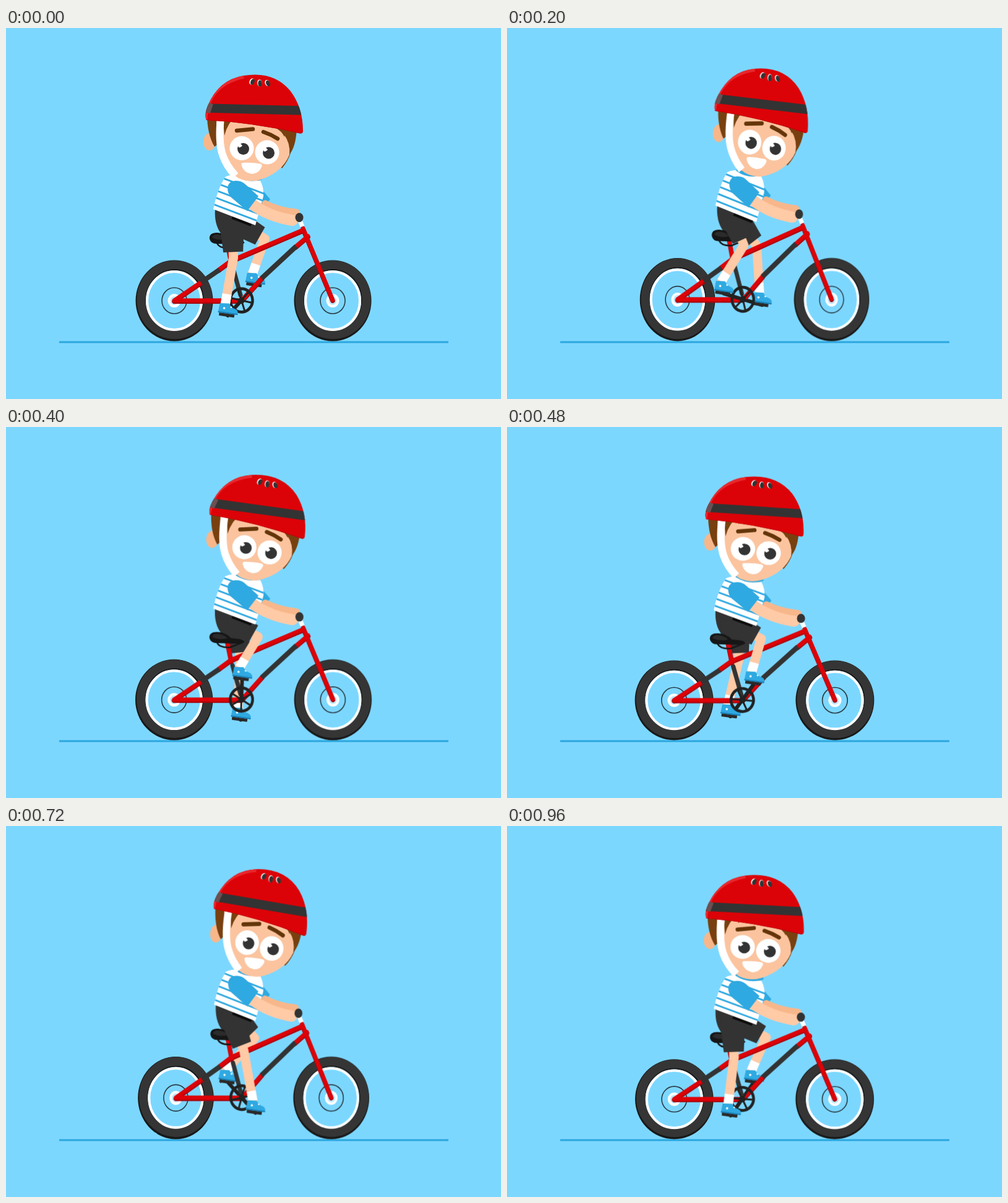
Animation of 800 by 600 pixels, one loop 1000 ms. Source, as an HTML page:

```html
<!DOCTYPE html>
<html lang="en">
<head>
<meta charset="utf-8">
<title>Boy on a bike</title>
<style>
  html, body { margin: 0; width: 100%; height: 100%; overflow: hidden; background: #7cd7ff; }
  svg { display: block; width: 100vw; height: 100vh; }
  .red { stroke: #dc0308; }
  .dark { stroke: #333; }
  .line { fill: none; stroke-linecap: round; stroke-linejoin: round; }
  .skin { fill: #fbc49f; }
  .blue { fill: #2fa9e1; }
  .hair { fill: #78400f; }
  .ink { fill: #333; }
  .leg { stroke: #ffcaa6; stroke-width: 15; }
  .sock { stroke: #fff; stroke-width: 15; stroke-linecap: butt; }
  .crank { stroke: #222; stroke-width: 6; }
</style>
</head>
<body>
<svg viewBox="0 0 800 600" xmlns="http://www.w3.org/2000/svg">
  <defs>
    <filter id="rough" filterUnits="userSpaceOnUse" x="195" y="55" width="410" height="460" color-interpolation-filters="sRGB">
      <feTurbulence type="fractalNoise" baseFrequency=".22" numOctaves="1" seed="4"/>
      <feDisplacementMap in="SourceGraphic" scale="1.6" xChannelSelector="R" yChannelSelector="G"/>
    </filter>
    <g id="wheel">
      <path d="M-62.5 0a62.5 65.5 0 1 0 125 0a62.5 65.5 0 1 0 -125 0M-46 0a46 49 0 1 1 92 0a46 49 0 1 1 -92 0" fill="#191919"/>
      <ellipse cx=".5" cy="-1.5" rx="54" ry="56.500" fill="none" stroke="#353535" stroke-width="14"/>
      <ellipse rx="44" ry="47" fill="none" stroke="#fff" stroke-width="4"/>
      <ellipse rx="20" ry="21" fill="none" stroke="#2b3b45" stroke-width="1.600"/>
      <ellipse rx="8.500" ry="9" fill="#bfeaff" stroke="#fff" stroke-width="4"/>
    </g>
    <g id="shoe">
      <rect x="-14" y="5" width="25" height="7" rx="1" fill="#2a2a2a"/>
      <path d="M-15 -8L0 -9.500Q4 -3 11 -2Q17 0 16 7L-16 7Z" class="blue"/>
      <path d="M-16 6H16" stroke="#1b7fb5" stroke-width="2"/>
      <circle cx="-7" cy="-1" r="1.800" fill="#fff"/>
      <circle cx="4" cy="-4" r="1.300" fill="#fff"/>
    </g>
    <path id="tubes" d="M272 441H380M272 441L316 411M344 391L363 377L480 327M488 337L468 354M414 404L382 440M358 348L364 378M480 324L528 440"/>
    <g id="eye">
      <circle r="19.500" fill="#fff"/>
      <circle cx="2.500" cy="1" r="9.500" class="ink"/>
      <path d="M-8 -5L-3 -9L1 -4Q-1 -2 -4 -1Z" fill="#fff"/>
    </g>
    <clipPath id="shirtClip">
      <path id="shirt" d="M354 241Q363 236 374 238Q392 248 411 247Q417 258 416 272L403 319L335 293Q341 262 354 241Z"/>
    </clipPath>
    <clipPath id="shell">
      <path id="dome" d="M324 149Q320 141 326 126Q343 84 384 77Q432 69 459 101Q480 128 480 167Q480 171 475 170.500Q400 153 324 149Z"/>
    </clipPath>
  </defs>

  <path d="M86 508H715" stroke="#2ba7de" stroke-width="3"/>

  <g filter="url(#rough)"><g id="all">
    <use href="#wheel" x="272" y="441"/>
    <use href="#wheel" x="528" y="441"/>

    <path id="crankB" class="line crank"/>
    <path id="legB" class="line leg"/>
    <path id="sockB" class="line sock"/>
    <use id="shoeB" href="#shoe"/>
    <path id="thighB" class="ink"/>

    <path d="M416 264L427 277L419 287L408 285Z" class="blue"/>
    <path d="M419 284Q440 295 469 298" class="line" stroke="#f7b78b" stroke-width="11"/>
    <path d="M338 292L398 315L393 334Q366 350 348 333Q336 318 338 292Z" class="ink"/>

    <path d="M366 385L379 432" class="line dark" stroke-width="7"/>
    <use href="#tubes" y="1.200" class="line" stroke="#a8040d" stroke-width="7.500"/>
    <use href="#tubes" y="-.5" class="line red" stroke-width="6.500"/>
    <path d="M315 411.500L345 391M469 353L413 405" fill="none" class="dark" stroke-width="8"/>
    <path d="M474 309L479 321" stroke="#fff" stroke-width="7"/>
    <path d="M341 348Q345 357 362 356L384 347" class="line" stroke="#181818" stroke-width="2.600"/>
    <path d="M329 341Q328 331 341 331Q354 331 364 341L382 343Q387 347 380 350L341 349Q331 349 329 341Z" fill="#161616"/>
    <path d="M333 339Q334 334 341 334Q351 334 358 341Q345 345 333 339Z" fill="#2b2b2b"/>

    <g id="ring" class="line" stroke="#222">
      <circle r="18" stroke-width="4.500"/>
      <path d="M-18 0H18M-9 -15.600L9 15.600M9 -15.600L-9 15.600" stroke-width="3"/>
      <circle r="4.500" fill="#222"/>
    </g>
    <path id="crankF" class="line crank"/>
    <path id="legF" class="line leg"/>
    <path id="sockF" class="line sock"/>
    <use id="shoeF" href="#shoe"/>
    <path id="thighF" class="ink"/>

    <path d="M366 305L397 317" stroke="#0d0d0d" stroke-width="8"/>
    <path d="M374 234L411 238L410 246Q391 256 372 242Z" fill="#f0ae80"/>
    <use href="#shirt" fill="#fff"/>
    <g clip-path="url(#shirtClip)">
      <path d="M330 235L430 273M330 247L430 285M330 259L430 297M330 271L430 309M330 283L430 321" stroke="#2fa9e1" stroke-width="2.800"/>
    </g>
    <path d="M372 237Q390 249 412 243" class="line" stroke="#2fa9e1" stroke-width="5"/>
    <path d="M398 285Q425 305 463 311" class="line" stroke="#ffcaa6" stroke-width="18"/>
    <path d="M358 258Q360 247 372 247Q381 247 387 253L408 272L390 296L364 274Q358 268 358 258Z" class="blue"/>
    <ellipse cx="474" cy="306.500" rx="6.500" ry="7.500" class="ink"/>

    <g id="head">
      <ellipse cx="329" cy="184" rx="10" ry="14" fill="#f7b78b"/>
      <path d="M444 150L470 155Q470 187 460 202Q456 215 446 227L440 220Z" class="hair"/>
      <path d="M325 140L346 140V185L337 192Q325 172 325 140Z" class="hair"/>
      <path d="M340 140L341 187Q349 226 376 243Q394 251 412 245Q447 233 458 205Q460 186 449 172L445 150Z" class="skin"/>
      <path d="M350 140H374Q358 153 353 174ZM436 150H452L450 176Q445 166 436 162Z" class="hair"/>
      <path d="M347 145Q343 184 350 205Q356 223 371 239" fill="none" stroke="#fff" stroke-width="12"/>
      <use href="#eye" x="381" y="194.500"/>
      <use href="#eye" x="422" y="201"/>
      <path d="M373 166L399 163.500M416 168Q428 172 439 179" class="line" stroke="#643509" stroke-width="6.500"/>
      <path id="mouth" d="M382 218Q398 217 411 219.500Q415 221 413 225Q408 236 397 236Q384 234 380.500 222Q380 219 382 218Z" fill="#fff"/>
    </g>

    <g id="helmet">
      <use href="#dome" fill="#dc0308"/>
      <g clip-path="url(#shell)">
        <path d="M322 148Q324 92 384 78" fill="none" stroke="#e8282d" stroke-width="7"/>
        <path d="M318 129.500L484 133.500" class="dark" stroke-width="14.500"/>
        <path d="M326 137L331 122" stroke="#6b5052" stroke-width="8"/>
        <path d="M322 149Q400 153 480 171" fill="none" stroke="#c2040d" stroke-width="2"/>
      </g>
      <g fill="#fff">
        <ellipse cx="397.300" cy="86.500" rx="3.700" ry="5.300" transform="rotate(24 397.300 86.500)"/>
        <ellipse cx="409.800" cy="88.800" rx="3.700" ry="5.600"/>
        <ellipse cx="422.300" cy="89" rx="3.700" ry="5.300" transform="rotate(-24 422.300 89)"/>
      </g>
      <g class="ink">
        <ellipse cx="398.500" cy="87" rx="3.200" ry="5" transform="rotate(24 398.500 87)"/>
        <ellipse cx="410.500" cy="89.500" rx="3.200" ry="5.300"/>
        <ellipse cx="423.500" cy="89.500" rx="3.200" ry="5" transform="rotate(-24 423.500 89.500)"/>
      </g>
    </g>
  </g></g>
</svg>
<script>
const LOOP = 1000, STEP = 40;
const BB = [380.5, 440.5], CRANK = 33;

// time, crank angle, stretch, head x/y/turn, helmet x/y/turn
const POSES = [
  [0, 132, 0, 0, 0, 0, 0, 0, 0],
  [120, 168, .017, 8.6, -1.2, 2, 6, 0, 1],
  [220, 203, .028, 10.5, 0, 4.5, 10, 2, 6],
  [320, 240, .017, 9, 1.7, 5, 11, 3.5, 10],
  [480, 305, -.015, .5, -2, .7, -1.5, -2, 2.5],
  [600, 358, .023, 10, 0, 3, 7.5, 1, 2],
  [720, 407, .019, 8, 1, 4, 9, 2.5, 8],
  [840, 452, -.008, .5, -1, 1, 3, 1, 6],
  [960, 484, -.013, 0, -3, 0, -1, -2, 1.7]
];

const $ = id => document.getElementById(id);
const set = (id, name, value) => $(id).setAttribute(name, value);
const move = (id, value) => set(id, 'transform', value);

// Pose by index, wrapped around the loop
function pose(i) {
  const n = POSES.length, turn = Math.floor(i / n);
  const p = POSES[i - turn * n].slice();
  p[0] += turn * LOOP;
  p[1] += turn * 360;
  return p;
}

// Smooth cubic through the poses
function sample(t) {
  let i = POSES.length - 1;
  while (POSES[i][0] > t) i--;
  const [a, b, c, d] = [-1, 0, 1, 2].map(k => pose(i + k));
  const h = c[0] - b[0], u = (t - b[0]) / h;
  return b.map((v, k) => {
    const m0 = (c[k] - a[k]) / (c[0] - a[0]) * h;
    const m1 = (d[k] - v) / (d[0] - b[0]) * h;
    const e = u * u * (3 - 2 * u);
    return v + (c[k] - v) * e + u * (1 - u) * ((1 - u) * m0 - u * m1);
  });
}

const along = (p, q, len) => {
  const d = Math.hypot(q[0] - p[0], q[1] - p[1]);
  return [p[0] + (q[0] - p[0]) * len / d, p[1] + (q[1] - p[1]) * len / d];
};
const path = pts => 'M' + pts.map(p => p.map(v => v.toFixed(2)).join(' ')).join('L');

function leg(side, deg, shift) {
  const a = deg * Math.PI / 180, cos = Math.cos(a), sin = Math.sin(a);
  const pedal = [BB[0] + CRANK * cos, BB[1] + CRANK * sin];
  const hip = [365 + shift, 315];
  const knee = [389 + shift + 12 * cos - 18 * sin, 356 - 4 * cos + 17 * sin];
  const ankle = [pedal[0] - 4, pedal[1] - 19];
  const hem = along(knee, hip, 9);
  const [nx, ny] = along([0, 0], [hip[1] - knee[1], knee[0] - hip[0]], 1);
  const edge = (p, w) => [p[0] + nx * w, p[1] + ny * w];

  set('crank' + side, 'd', path([BB, pedal]));
  set('leg' + side, 'd', path([hem, knee, ankle]));
  set('sock' + side, 'd', path([along(ankle, knee, 16), ankle]));
  set('thigh' + side, 'd', path([edge(hip, 20), edge(hem, 16), edge(hem, -16), edge(hip, -20)]) +
    'A20 20 0 0 0 ' + edge(hip, 20).join(' ') + 'Z');
  move('shoe' + side, `translate(${pedal[0] + 1} ${pedal[1] - 10}) rotate(8)`);
}

function draw(t) {
  const [, deg, s, hx, hy, hr, cx, cy, cr] = sample(t);
  move('all', `translate(401 507) scale(${1 - s} ${1 + s}) translate(-401 -507)`);
  move('head', `translate(${hx} ${hy}) rotate(${hr} 396 200)`);
  move('mouth', `translate(${-hx * .25} 0)`);
  move('helmet', `translate(${cx} ${cy}) rotate(${cr} 401 158)`);
  move('ring', `translate(${BB}) scale(1 1.05) rotate(${deg})`);
  leg('F', deg, 0);
  leg('B', deg + 180, 8);
}

let shown = -1;
function tick(now) {
  const t = Math.floor(now % LOOP / STEP) * STEP;
  if (t !== shown) draw(shown = t);
  requestAnimationFrame(tick);
}
draw(0);
requestAnimationFrame(tick);
</script>
</body>
</html>
```
